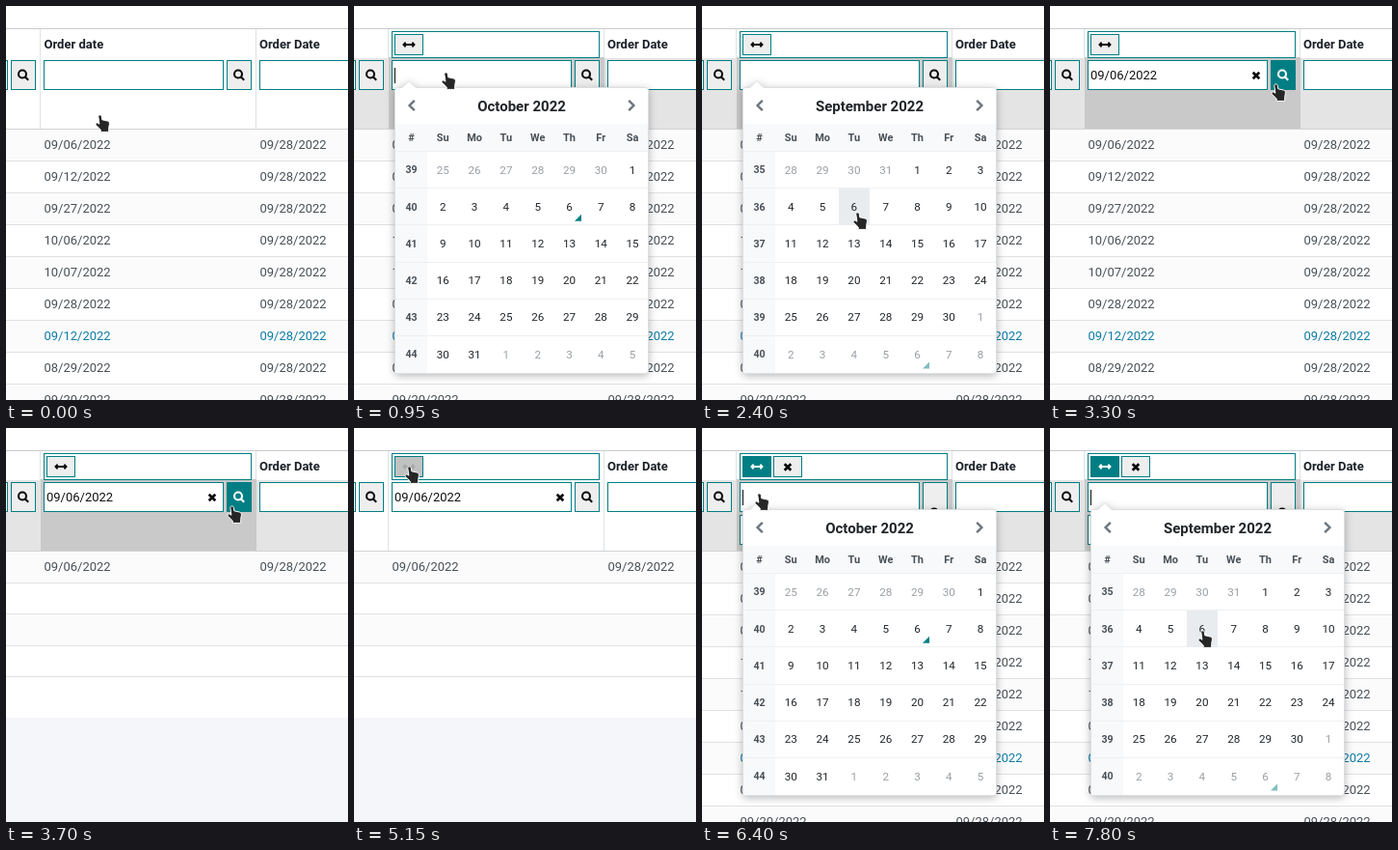
Write an HTML page that moves like this. It is 355 px wide and 408 px high and loops after 8000 ms.

```html
<!DOCTYPE html>
<html lang="en">
<head>
<meta charset="utf-8">
<title>Date filter</title>
<style>
html, body { margin: 0; width: 100%; height: 100%; overflow: hidden; background: #fff; }
svg { display: block; font: 13px Roboto, sans-serif; fill: #495057; }
rect, .line { shape-rendering: crispEdges; }
.line { stroke: #dfe1e4; }
.head { font-weight: 700; fill: #1b2028; }
.info { fill: #0d7ba6; }
.field { fill: #fff; stroke: #017e84; }
.btn { fill: #eee; stroke: #017e84; }
.icon { fill: none; stroke: #0b0b0b; }
.dark { fill: #111; }
.teal { fill: #017e84; }

.panel { fill: #fff; stroke: #dcdfe2; filter: drop-shadow(0 2px 4px rgba(0, 0, 0, .28)); }
.soft { fill: #f8f9fa; }
.month text { text-anchor: middle; font-size: 11.7px; fill: #212529; }
.month .name { font-size: 15px; font-weight: 700; }
.month .week { font-size: 10.6px; font-weight: 700; fill: #495057; }
.month .dow { font-size: 11px; font-weight: 700; fill: #495057; }
.month .out { fill: #9a9fa4; }
.chev { stroke: #6c757d; stroke-width: 2.4; }

.hover, .top, .picker, .sep, .oct, .caret, .value, .empty, .range, .hot {
  animation: 8s step-end infinite;
}
.hover { animation-name: hover; }
.top { animation-name: top; }
.picker { animation-name: picker; }
.sep { animation-name: sep; }
.oct { animation-name: oct; }
.caret { animation-name: caret; }
.value { animation-name: value; }
.empty { animation-name: empty; }
.range { animation-name: range; }
.hot { animation-name: hot; fill: #e9ecef; }
.find .btn { animation: findFill 8s linear infinite; }
.find .icon { animation: findInk 8s linear infinite; }
.span .btn { animation: spanFill 8s linear infinite; }
.span .icon { animation: spanInk 8s linear infinite; }
.cursor { animation: move 8s ease-in-out infinite; }

@keyframes hover {
  0%, 30.625%, 61.25% { opacity: 0; }
  5%, 36.25%, 78.75%, 100% { opacity: 1; }
}
@keyframes top {
  0%, 30.625%, 69.375% { opacity: 0; }
  3.75%, 36.25%, 73.125%, 100% { opacity: 1; }
}
@keyframes picker {
  0%, 30.625% { opacity: 0; }
  7.5%, 79.375%, 100% { opacity: 1; }
}
@keyframes sep {
  0%, 50% { opacity: 0; }
  19.375%, 90%, 100% { opacity: 1; }
}
@keyframes oct {
  0%, 50% { opacity: 1; }
  19.375%, 90%, 100% { opacity: 0; }
}
@keyframes caret {
  0%, 13.75%, 30%, 85.625% { opacity: 0; }
  7.5%, 22.5%, 79.375%, 91.875%, 100% { opacity: 1; }
}
@keyframes value {
  0%, 69.375%, 100% { opacity: 0; }
  30.625% { opacity: 1; }
}
@keyframes empty {
  0%, 69.375%, 100% { opacity: 0; }
  43.125% { opacity: 1; }
}
@keyframes range {
  0% { opacity: 0; }
  69.375%, 100% { opacity: 1; }
}
@keyframes hot {
  0%, 21.9%, 30.6%, 93.2% { opacity: 0; x: 43px; y: 85px; width: 33px; height: 37px; }
  12.9% { opacity: 1; x: 76px; y: 85px; width: 197px; height: 37px; }
  13.75%, 84.3% { opacity: 1; x: 43px; y: 85px; width: 33px; height: 37px; }
  22.9%, 94.7% { opacity: 1; x: 109px; y: 151px; width: 33px; height: 38px; }
  23.6% { opacity: 1; x: 109px; y: 189px; width: 33px; height: 38px; }
  24.1%, 27%, 96.2%, 100% { opacity: 1; x: 142px; y: 189px; width: 32px; height: 38px; }
  24.7% { opacity: 1; x: 142px; y: 227px; width: 32px; height: 38px; }
}
@keyframes findFill {
  0%, 38.75%, 60.5%, 100% { fill: #eee; }
  40%, 58.75% { fill: #017e84; }
}
@keyframes findInk {
  0%, 38.75%, 60.5%, 100% { stroke: #0b0b0b; }
  40%, 58.75% { stroke: #fff; }
}
@keyframes spanFill {
  0%, 62.5% { fill: #eee; }
  64.375% { fill: #c1c1c1; }
  67.5%, 100% { fill: #017e84; }
}
@keyframes spanInk {
  0%, 62.5% { stroke: #0b0b0b; }
  64.375% { stroke: #a9a9a9; }
  67.5%, 100% { stroke: #fff; }
}
@keyframes move {
  0%, .625% { transform: translate(92px, 112px); }
  5.625%, 12.2% { transform: translate(90px, 68px); }
  14.375%, 21.25% { transform: translate(57px, 108px); }
  25%, 26.25% { transform: translate(166px, 238px); }
  28.125%, 31.25% { transform: translate(156px, 213px); }
  39.375%, 57.5% { transform: translate(229px, 80px); }
  63.75%, 72.5% { transform: translate(52px, 39px); }
  73.125%, 75% { transform: translate(37px, 60px); }
  76.875%, 81.25% { transform: translate(54px, 67px); }
  86.25%, 92.5% { transform: translate(56px, 102px); }
  97%, 100% { transform: translate(153px, 209px); }
}
</style>
</head>
<body>
<script>
const fill = (x, y, w, h, attr) => `<rect x="${x}" y="${y}" width="${w}" height="${h}" ${attr}/>`;
const box = (x, y, w, h, cls) => fill(x + .5, y + .5, w - 1, h - 1, `class="${cls}"`);
const text = (x, y, s, cls = '') => `<text x="${x}" y="${y}" class="${cls}">${s}</text>`;
const line = (x1, y1, x2, y2, attr = '') =>
  `<path class="line" d="M${x1} ${y1}L${x2} ${y2}" ${attr}/>`;
const icon = (x, y, d, width, cls = '') =>
  `<path class="icon ${cls}" transform="translate(${x} ${y})" d="${d}" stroke-width="${width}"/>`;
const group = (cls, ...parts) => `<g class="${cls}">${parts.join('')}</g>`;

const LENS = 'M3 -1a4 4 0 1 1 -8 0a4 4 0 1 1 8 0M2 2L5.2 5.2';
const ARROWS = 'M-5 0H5M-3.4 -2.4L-5.6 0L-3.4 2.4M3.4 -2.4L5.6 0L3.4 2.4';
const CROSS = 'M-3.3 -3.3L3.3 3.3M3.3 -3.3L-3.3 3.3';

const search = (x, h = 31) =>
  box(x, 56, 26, h, 'btn') + icon(x + 13, 56 + h / 2, LENS, 2.1);

function rows() {
  const dates = ['09/06', '09/12', '09/27', '10/06', '10/07', '09/28', '09/12', '08/29', '09/20'];
  return dates.map((d, i) => {
    const y = 128 + 33 * i, cls = i === 6 ? 'info' : '';
    return fill(0, y, 355, 32, `fill="${i % 2 ? '#fff' : '#fbfbfb'}"`) +
      line(0, y + 32.5, 355, y + 32.5) +
      text(39.5, y + 20, d + '/2022', cls) + text(263.5, y + 20, '09/28/2022', cls);
  }).join('');
}

function emptyRows() {
  return group('empty',
    fill(0, 161, 355, 139, 'fill="#fff"'),
    fill(0, 193, 355, 32, 'fill="#fbfbfb"'),
    ...[192.5, 225.5, 257.5].map(y => line(0, y, 355, y)),
    fill(0, 300, 355, 108, 'fill="#f5f6fa"'));
}

function header() {
  return fill(0, 0, 355, 127, 'fill="#fff"') +
    line(0, 23.5, 355, 23.5, 'style="stroke:#c9cccf"') +
    line(35.5, 24, 35.5, 127) + line(259.5, 24, 259.5, 127) +
    group('hover',
      fill(0, 54, 355, 73, 'fill="#e4e4e4"'),
      fill(36, 53, 224, 74, 'fill="#c9c9c9"')) +
    line(0, 127.5, 355, 127.5, 'style="stroke:#d0d3d6"') +
    text(39.5, 44, 'Order date', 'head') + text(263, 44, 'Order Date', 'head') +
    box(-20, 56, 22, 31, 'field') + search(5) +
    box(39, 56, 187, 31, 'field') + group('find', search(229)) +
    box(263, 56, 120, 31, 'field') +
    group('value', text(42, 76, '09/06/2022', 'dark'), icon(214, 72, CROSS, 2.7)) +
    fill(42, 64, 1, 16, 'class="caret dark"') +
    group('range', box(39, 90, 187, 31, 'field'), search(229, 65)) +
    group('top',
      box(39, 26, 216, 28, 'field'),
      group('span', box(42, 29, 30, 22, 'btn'), icon(57, 40, ARROWS, 1.8)),
      group('range', box(74, 29, 30, 22, 'btn'), icon(89, 40.5, CROSS, 2.7)));
}

// Days run on from `first` of the month before, which has `before` days.
function month(cls, name, week, first, before, days, today) {
  const colX = c => 59.5 + 32.8 * c, rowY = r => 169.5 + 38.2 * r;
  let s = text(174, 109, name, 'name');
  ['#', 'Su', 'Mo', 'Tu', 'We', 'Th', 'Fr', 'Sa'].forEach((d, c) => {
    s += text(colX(c), 140, d, 'dow');
  });
  for (let r = 0; r < 6; r++) s += text(colX(0), rowY(r) + 3.8, week + r, 'week');
  for (let i = 0; i < 42; i++) {
    const n = first + i - before, out = n < 1 || n > days;
    const x = colX(i % 7 + 1), y = rowY(Math.floor(i / 7));
    const day = n < 1 ? n + before : n > days ? n - days : n;
    s += text(x, y + 4, day, out ? 'out' : '');
    if (i === today)
      s += `<path class="teal" opacity="${out ? .5 : 1}" d="M${x + 12.5} ${y + 8}v7h-7z"/>`;
  }
  return group('month ' + cls, s);
}

function picker() {
  const rules = [0, 1, 2, 3, 4, 5].map(r => {
    const y = Math.round(150 + 38.2 * r) + .5;
    return line(43, y, 305, y, 'style="stroke:#eef0f2"');
  });
  return group('picker',
    '<path class="panel" d="M45.5 84.5H50L57 77.5L64 84.5H302.5q3 0 3 3V377.5q0 3 -3 3H45.5q-3 0 -3 -3V87.5q0 -3 3 -3z"/>',
    fill(43, 122, 262, 28, 'class="soft"'),
    fill(43, 150, 33, 230, 'class="soft"'),
    ...rules,
    fill(43, 85, 33, 37, 'class="hot"'),
    icon(60, 103, 'M2.8 -5.2L-2.4 0L2.8 5.2', 2.4, 'chev'),
    icon(288, 103, 'M-2.8 -5.2L2.4 0L-2.8 5.2', 2.4, 'chev'),
    month('oct', 'October 2022', 39, 25, 30, 31, 11),
    month('sep', 'September 2022', 35, 28, 31, 30, 39));
}

const cursor = `<path class="cursor" fill="#262626" stroke="#fff" d="M4.6 1.1C5.9 .5 7.1 1.2 7.3 2.4
  L7.8 5.8L13.3 7C14.9 7.4 15.6 8.6 15.4 10.2L14.7 14.4V18.4H6.2V16L1.3 11.2
  C.3 9.7 1.8 8.3 3.3 9.2L4.9 10.2L3.9 3.2C3.7 2 3.9 1.4 4.6 1.1z"/>`;

document.body.innerHTML = '<svg width="355" height="408" viewBox="0 0 355 408">' +
  rows() + emptyRows() + header() + picker() + cursor + '</svg>';
</script>
</body>
</html>
```
